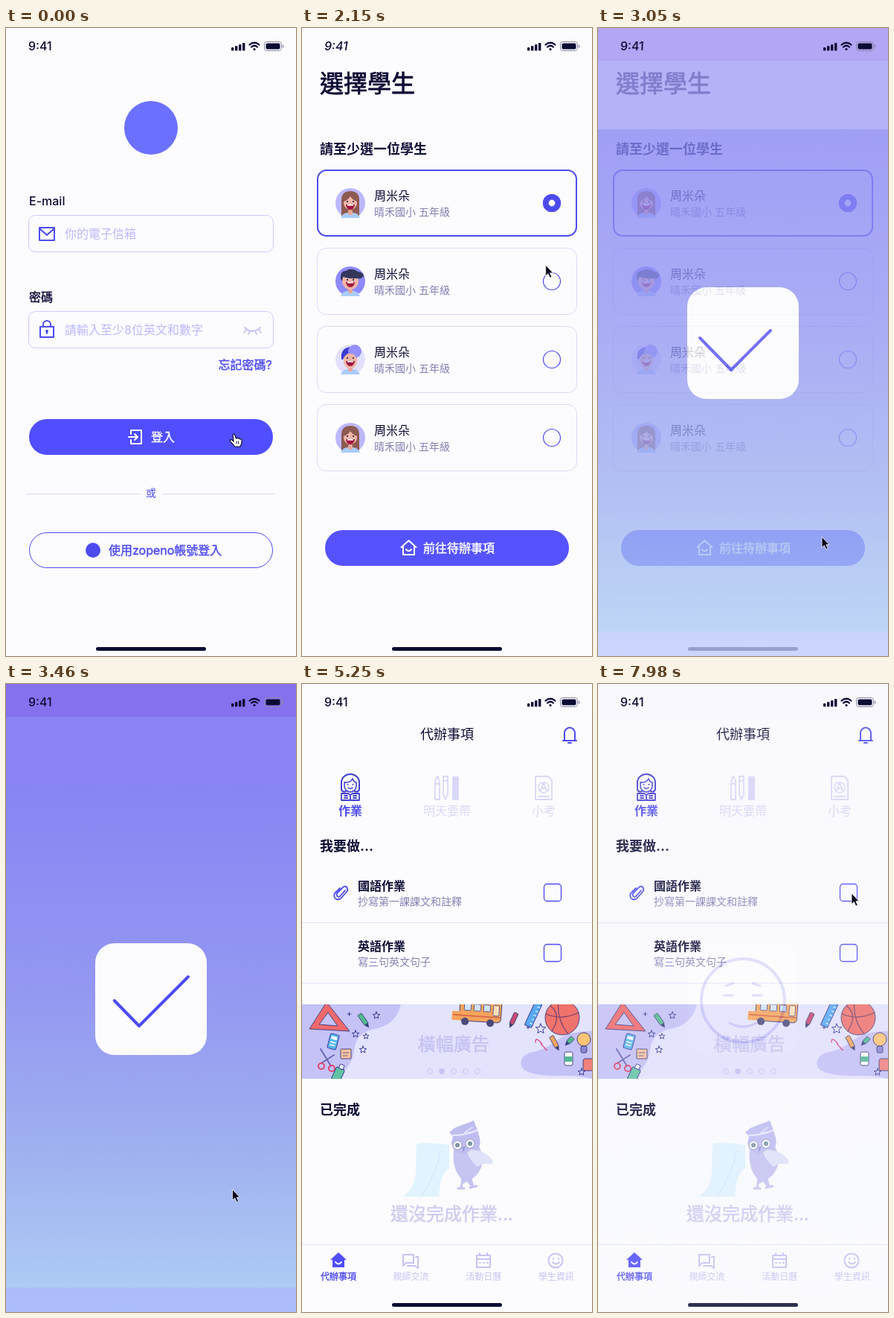
These frames come from a looping animation (390x843 px, 8000 ms). An HTML page:

```html
<!DOCTYPE html>
<html lang="zh-Hant">
<head>
<meta charset="utf-8">
<title>學生待辦事項</title>
<style>
  html, body { margin: 0; width: 100%; height: 100%; overflow: hidden; background: #fcfcff; }
  svg { display: block; width: 390px; height: 843px; }
  text { font-family: Inter, "Noto Sans CJK TC", "Noto Sans CJK", sans-serif; white-space: pre; }
</style>
</head>
<body>
<svg id="stage" viewBox="0 0 390 843" xmlns="http://www.w3.org/2000/svg"></svg>
<script>
const INK = '#0c0b33', VIOLET = '#4d4bf0', PALE = '#c6c3f2', FAINT = '#dad8f8', GREY = '#8482b2', BG = '#fcfcff';

// Drawing helpers, all returning SVG markup
const text = (x, y, s, size = 16, fill = INK, weight = 400, extra = '') =>
  `<text x="${x}" y="${y}" font-size="${size}" fill="${fill}" font-weight="${weight}" ${extra}>${s}</text>`;
// A thin outline gives the medium weight that the CJK face lacks
const medium = (x, y, s, size, fill = INK) => text(x, y, s, size, fill, 400, `stroke="${fill}" stroke-width="${size / 40}"`);
const rect = (x, y, w, h, r, fill = 'none', stroke = 'none', sw = 1) =>
  `<rect x="${x}" y="${y}" width="${w}" height="${h}" rx="${r}" fill="${fill}" stroke="${stroke}" stroke-width="${sw}"/>`;
const circle = (x, y, r, fill = 'none', stroke = 'none', sw = 1) =>
  `<circle cx="${x}" cy="${y}" r="${r}" fill="${fill}" stroke="${stroke}" stroke-width="${sw}"/>`;
const shape = (d, fill) => `<path d="${d}" fill="${fill}"/>`;
const line = (d, stroke, sw = 2, extra = '') =>
  `<path d="${d}" fill="none" stroke="${stroke}" stroke-width="${sw}" stroke-linecap="round" stroke-linejoin="round" ${extra}/>`;
const at = (x, y, body, angle = 0) => `<g transform="translate(${x} ${y}) rotate(${angle})">${body}</g>`;
const layer = (id, body) => `<g id="${id}">${body}</g>`;
const page = (id, body, italic) => layer(id, rect(0, 0, 390, 843, 0, BG) + body + statusBar(italic) + homeBar);

const homeBar = rect(121, 831, 148, 5, 2.5, INK);
const statusBar = italic =>
  text(30, 30, '9:41', 16, INK, 500, italic ? 'font-style="italic"' : '') +
  [0, 1, 2, 3].map(i => rect(303 + i * 5, 26 - i * 2, 3.4, 4.5 + i * 2, 1, INK)).join('') +
  line('M327.5 22.5Q334 17 340.5 22.5M330 25.5Q334 22 338 25.5', INK, 2.2) + circle(334, 28.5, 1.6, INK) +
  rect(347.5, 18.5, 23, 12, 3.5, 'none', '#8c8ba6') + rect(349.5, 20.5, 19, 8, 2, INK) + rect(371.8, 22.5, 1.4, 4, .7, '#8c8ba6');

const houseIcon = (color, solid) => solid
  ? shape('M0-11L11-1H8V9H-8V-1H-11Z', color) + line('M-4 2Q0 7 4 2', '#fff', 2)
  : line('M-10-1L0-10L10-1M-7.5-3V9H7.5V-3M-3.5 2Q0 6 3.5 2', color, 2);

// Sign-in page
const login = page('login',
  circle(195, 134, 36, '#6c70ff') +
  text(31, 238, 'E-mail', 16, INK, 500) + rect(30.5, 251.5, 329, 49, 9, BG, '#cfcbff') +
  line('M45 268H65V285H45ZM45 269L55 278L65 269', VIOLET, 2) + text(79, 282, '你的電子信箱', 16, '#bcb7ff') +
  medium(31, 367, '密碼', 16) + rect(30.5, 380.5, 329, 49, 9, BG, '#cfcbff') +
  line('M46 401H64V415H46ZM50 401V398A5 5 0 0 1 60 398V401M55 408V410', VIOLET, 2) + circle(55, 407, 2, VIOLET) +
  text(79, 411, '請輸入至少8位英文和數字', 16, '#bcb7ff') +
  line('M321 402Q331 412 342 402M323 405L320 409M328 407L326 411M335 407L337 411M340 405L343 409', PALE, 1.8) +
  medium(285.5, 458, '忘記密碼?', 16, VIOLET) +
  rect(31, 525, 328, 48, 24, '#504eff') +
  line('M168 545V540H182V558H168V553M165 549H176M173 545L177 549L173 553', '#fff', 2) +
  medium(195, 555, '登入', 16, '#fff') +
  line('M27 625.5H181M210 625.5H361', FAINT, 1) + text(188, 629, '或', 14, VIOLET) +
  rect(31.5, 677.5, 327, 47, 23.5, BG, VIOLET) + circle(117, 701, 10, VIOLET) +
  medium(138, 707, '使用zopeno帳號登入', 16, VIOLET));

// Student picker
const faceParts = mouthY =>
  circle(-4, -2, 1, INK) + circle(4, -2, 1, INK) + shape(`M-6 ${mouthY}H6Q5 ${mouthY + 7} 0 ${mouthY + 7}T-6 ${mouthY}`, '#a3143f') +
  rect(-4, mouthY, 8, 1.6, 0, '#fff');
const shirt = shape('M-13 20Q-10 13-4 13H4Q10 13 13 20Z', '#a9cdff') + rect(-3, 9, 6, 7, 2, '#e9a79a');
const avatars = {
  girl: circle(0, 0, 20, '#bdb8ff') + shape('M-12 17V-4Q-12-16 0-16T12-4V17Z', '#8d5a50') + shirt +
    circle(0, 0, 9, '#f2b6a8') + shape('M-9-2Q-8-12 0-12T9-2Q3-4 0-9Q-3-4-9-2', '#8d5a50') + faceParts(2),
  boy: circle(0, 0, 20, '#8e8aff') + shirt + circle(0, 0, 11, '#f2b6a8') +
    shape('M-13-3Q-14-14-6-14Q2-19 10-13Q18-12 18-7Q14-2 9-4Q-2-3-10-6L-11 0Z', '#34385c') + faceParts(1),
  cap: circle(0, 0, 20, '#e3e0ff') + shirt + rect(-9, -11, 18, 23, 9, '#efb5a5') +
    shape('M-12 0Q-14-15 0-17L5-10Q-6-10-10 0Z', '#3b3bd0') + circle(6, -11, 9, '#9490ff') + circle(0, 0, 8, '#efb5a5') + faceParts(2),
};
const studentCard = (kind, i) => at(0, i * 105,
  rect(20.5, 190.5, 349, 89, 12, BG, FAINT) + at(65, 235, avatars[kind]) +
  text(97, 231, '周米朵') + text(97, 252, '晴禾國小 五年級', 14, GREY) + circle(336, 235, 11.5, BG, VIOLET, 1.2));
const goButton = (fill, ink) => rect(31, 674, 328, 48, 24, fill) + at(143.5, 698, houseIcon(ink)) + medium(163, 704, '前往待辦事項', 16, ink);
const students = page('students',
  medium(24, 86, '選擇學生', 32) + text(24, 169, '請至少選一位學生', 18, INK, 700) +
  ['girl', 'boy', 'cap', 'girl'].map(studentCard).join('') + goButton('#dddaff', '#9794bb') +
  layer('chosen', rect(21, 191, 348, 88, 12, 'none', VIOLET, 2) + circle(336, 235, 8.2, BG, VIOLET, 7.6) + goButton('#5553ff', '#fff')),
  true);

// To-do page
const star = (x, y, r = 5) => {
  const p = [...Array(10)].map((_, i) => {
    const a = i * Math.PI / 5, d = i % 2 ? r * .45 : r;
    return `${(x + d * Math.sin(a)).toFixed(1)} ${(y - d * Math.cos(a)).toFixed(1)}`;
  });
  return line(`M${p.join('L')}Z`, '#3b3f9a', 1);
};
const pencil = (x, y, angle, color, len = 16) => at(x, y,
  rect(-3, -len / 2, 6, len, 1, color, '#3b3f7a', .8) + shape(`M-3 ${len / 2}H3L0 ${len / 2 + 6}Z`, '#3b3f7a'), angle);
const bus = at(236, 441,
  rect(-24, -16, 56, 28, 5, '#f5a55c', '#4a4180') + shape('M-34 0H-22V12H-34Z', '#f5a55c') +
  [-18, -5, 8].map(x => rect(x, -11, 9, 9, 1, '#cfe3ff', '#4a4180', .8)).join('') + line('M-32 5H30', '#d96b4c', 2) +
  circle(-16, 13, 5, '#4a4a7c') + circle(18, 13, 5, '#4a4a7c') + rect(21, -11, 8, 14, 1, '#ffe0b8', '#4a4180', .8), 4);
const banner = `<clipPath id="strip"><rect y="430" width="390" height="100"/></clipPath><g clip-path="url(#strip)">` +
  rect(0, 430, 390, 100, 0, '#e4e3fe') +
  shape('M0 430H133Q126 458 98 463Q72 468 70 492Q66 522 34 530H0Z', '#c5c2f8') +
  shape('M390 466Q358 465 341 480Q325 492 306 495Q290 502 296 515Q304 526 345 526Q370 525 390 530Z', '#c5c2f8') +
  `<path d="M10 463L33 427L64 466ZM23 457L35 441L48 459Z" fill="#f0696b" fill-rule="evenodd" stroke="#4a4180"/>` +
  pencil(82, 450, -35, '#53b98f') + pencil(285, 449, 25, '#c84a72') + pencil(339, 480, -28, '#f3a45d') + pencil(361, 478, 45, '#53b98f', 9) +
  at(42, 480, rect(-6, -10, 12, 20, 2, '#58b7ee', '#3b3f9a') + rect(-4, -7, 8, 4, 0, '#fff') + line('M-3 1H3M-3 5H3', '#fff', 1.5), 15) +
  rect(52, 490, 14, 13, 1, '#f6c3a0', '#4a4180') + line('M55 495H63M55 499H61', '#4a4180', .8) +
  line('M25 490L39 513M43 498L26 509', '#6a68b8', 2) + circle(26, 513, 4, 'none', '#dd466b', 2) + circle(40, 516, 4, 'none', '#dd466b', 2) +
  at(49, 523, rect(-6, -8, 12, 20, 3, '#62c3a2', '#3b3f9a') + rect(-3, -13, 6, 6, 1, '#fff', '#3b3f9a'), 25) +
  bus + at(311, 444, rect(-5, -17, 10, 34, 1, '#58a9f4', '#3b3f9a') + line('M1-12H4M1-6H4M1 0H4M1 6H4M1 12H4', '#fff', 1), 25) +
  circle(350, 448, 23, '#f0736d', '#4a4180') + line('M328 443Q350 452 372 441M345 426Q342 450 358 470M334 432Q350 444 336 466', '#74406c', 1.2) +
  circle(379, 477, 9, '#ffc474', '#4a4180') + rect(375, 486, 8, 9, 2, '#8587d2', '#4a4180') +
  rect(353, 494, 11, 18, 2, '#fff', '#4a4180') + rect(353, 500, 11, 7, 0, '#57b695') + rect(378, 503, 18, 16, 3, '#f0817d', '#4a4180') +
  line('M314 481Q314 474 319 479T322 483T326 488T327 490', '#d95b94', 1.5) +
  star(72, 470) + star(100, 445) + star(86, 473, 4) + star(82, 491) + star(321, 463, 7) + star(376, 521) +
  line('M61 443H66M63.5 440.5V445.5M302 461H306M304 459V463', '#3b3f9a', 1) +
  medium(156, 492, '橫幅廣告', 24, PALE) +
  [0, 1, 2, 3, 4].map(i => circle(172 + i * 16, 520, 3.5, i === 1 ? PALE : 'none', PALE)).join('') + '</g>';

const owl =
  shape('M154 617Q176 614 198 619V650Q186 655 184 688H135Q152 678 153 655Z', '#e0f3ff') +
  line('M186 626Q181 660 160 688', '#cbe6fb', 1) +
  shape('M204 622Q201 650 214 664L217 671L222 668L228 676L229 664Q242 655 244 636L238 620Z', '#c6c4f0') +
  shape('M198 602L205 596L231 586L236 599L238 606Q243 620 232 628L218 631Q203 630 201 616L203 607Z', '#bfbdf0') +
  shape('M227 625Q250 627 257 641L254 645Q244 642 236 648Q226 640 222 629Z', '#e0e2fa') +
  line('M201 606Q220 606 236 599', '#e9e7ff', 2) + line('M219 602L229 595M220 603L230 601', '#e9e7ff', 1.5) +
  line('M216 664L214 676M226 662L230 674M210 677H218M226 676L235 674', PALE, 3) +
  [[209, 619], [226, 617]].map(([x, y]) => circle(x, y, 6, '#f8f8ff', '#a9abc8', 1.2) + circle(x, y, 3, '#7d93a6')).join('') +
  shape('M215 621H220L217 629Z', '#9d9bd8');

const task = (dy, title, note) => at(0, dy,
  text(75, 276.5, title, 16, INK, 700) + text(75, 297, note, 14, GREY) +
  rect(325.5, 268.5, 23, 23, 4, BG, VIOLET, 1.3) + line('M0 320.5H390', '#e4e2fa', 1));

const readerIcon = line('M53 142V132A12 11 0 0 1 77 132V142Q75 146 71 144M53 142Q55 146 59 144', '#403ed0', 2) +
  line('M57 132Q65 133 68 127Q70 132 73 132V137A8 8 0 0 1 57 137ZM62 139Q65 142 68 139M61 135H62M68 135H69', '#403ed0', 1.6) +
  line('M53 147H62L65 149L68 147H77V156H53ZM65 149V156M57 150H61M69 150H73M57 153H61M69 153H73', '#403ed0', 1.8);
const toolsIcon = line('M179 130L182 124L185 130V155H179ZM179 134H185M190 124H196V148L193 155L190 148ZM190 130H196', FAINT, 1.8) + rect(202, 124, 9, 32, 1, FAINT);
const quizIcon = line('M314 124H331L336 129V155H314ZM318 151H332M321 143L325 133L329 143M323 140H327', FAINT, 1.8) + circle(325, 139, 7, 'none', FAINT, 1.5);

const tabs = line('M0 752.5H390', '#e4e2fa', 1) +
  at(49, 774, houseIcon('#504eff', true)) +
  line('M136 766H150V777H140L136 781ZM153 769H156V784L152 781H142', PALE, 2) +
  line('M235 767H253V783H235ZM235 772H253M239 764V767M249 764V767M239 777H240M244 777H245M249 777H250', PALE, 2) +
  circle(341, 774, 9.5, 'none', PALE, 2) + line('M338 771V772M345 771V772M337 776Q341 781 346 776', PALE, 2) +
  ['代辦事項', '親師交流', '活動日曆', '學生資訊'].map((s, i) => (i ? text : medium)(25 + i * 97.6, 800, s, 12, i ? PALE : VIOLET)).join('');

const todo = page('todo',
  text(159, 74, '代辦事項', 18) +
  line('M351 76H369M353 76V66A7 7.5 0 0 1 367 66V76M358 79H362', VIOLET, 2) +
  readerIcon + toolsIcon + quizIcon +
  text(49, 176, '作業', 16, VIOLET, 700) + text(163, 176, '明天要帶', 16, FAINT) + text(309, 176, '小考', 16, FAINT) +
  text(24, 224, '我要做...', 18, INK, 700) +
  at(52, 280, line('M6-3L-1 5Q-4 7-5 4Q-6 2-4 0L3-7Q7-10 9-6Q10-3 8-1L0 8Q-5 11-8 7Q-10 3-7 0L-1-6', VIOLET, 1.8)) +
  task(0, '國語作業', '抄寫第一課課文和註釋') + task(81, '英語作業', '寫三句英文句子') +
  banner + text(24, 578, '已完成', 18, INK, 700) + owl + medium(119, 720, '還沒完成作業...', 24, '#cfccf0') + tabs);

// Pop-ups
const gradient = (id, ...stops) => `<linearGradient id="${id}" x2="0" y2="1">` +
  stops.map(([offset, color]) => `<stop offset="${offset}" stop-color="${color}"/>`).join('') + '</linearGradient>';
const popup = (id, panel, icon) => layer(id, rect(0, 0, 390, 843, 0, BG) +
  layer(id + 'Wash', rect(0, 0, 390, 843, 0, 'url(#wash)') + rect(0, 0, 390, 44, 0, '#8571ee')) +
  panel + rect(120, 348, 150, 150, 26, '#fcfcff') + icon + statusBar());
const donePopup = popup('done', rect(0, 136, 390, 674, 0, 'url(#panel)'),
  line('M137 416L179 459L245 393', VIOLET, 4, 'id="tick" pathLength="1"'));
const smilePopup = popup('smile', '',
  circle(195, 425, 56, 'none', VIOLET, 4) +
  line('M169 418H181M208 418H220M172 405L182 402M208 402L218 405M177 455Q195 465 213 455', VIOLET, 3));

const arrow = `<path d="M0 0V14.5L3.3 11.5L5.8 17L8.2 16L5.8 10.6H10Z" fill="#05051a" stroke="#fff" stroke-width=".8"/>`;
const hand = `<path d="M2 1Q4-1 5 2L6.500 6Q8 4 9 6Q11 5 11.500 7Q14 6 14 9V12L12 17H5L-2 9Q-2 7 1 8L3 10Z" fill="#fff" stroke="#05051a" stroke-width="1.1"/>` +
  line('M7 10V13M9.500 10V13', '#05051a', .9);

document.getElementById('stage').innerHTML =
  `<defs>${gradient('wash', [0, '#8a84f6'], [.2, '#8a84f6'], [1, '#aebefc'])}` +
  `${gradient('panel', [0, '#8785f4'], [.4, '#9497f2'], [.7, '#9eaef0'], [1, '#adcbf4'])}</defs>` +
  login + students + donePopup + todo + smilePopup +
  layer('cursor', layer('arrow', arrow) + layer('hand', hand));

// Timing
const el = Object.fromEntries([...document.querySelectorAll('g[id], #tick')].map(n => [n.id, n]));
const progress = (t, start, length) => Math.min(1, Math.max(0, (t - start) / length));
const ease = p => p < .5 ? 2 * p * p : 1 - 2 * (1 - p) * (1 - p);
const fade = (t, start, length = 330) => ease(progress(t, start, length));

const cursorPath = [
  [0, 303, 545], [600, 303, 545], [1260, 280, 307], [1650, 334, 232], [1950, 334, 232], [2600, 301, 683],
  [3400, 301, 683], [3850, 395, 560], [5950, 395, 380], [6490, 344, 300], [7000, 341, 281], [8000, 341, 281],
];
function cursorAt(t) {
  const i = cursorPath.findIndex(k => k[0] > t);
  const [t0, x0, y0] = cursorPath[i - 1], [t1, x1, y1] = cursorPath[i];
  const p = ease((t - t0) / (t1 - t0));
  return [x0 + (x1 - x0) * p, y0 + (y1 - y0) * p];
}
const setOpacity = (id, value) => {
  el[id].setAttribute('opacity', value);
  el[id].style.display = value > 0 ? '' : 'none';
};
function showPopup(id, amount) {
  setOpacity(id, amount);
  setOpacity(id + 'Wash', amount);
}

function draw(t) {
  setOpacity('students', fade(t, 100));
  setOpacity('chosen', fade(t, 1800, 200));
  showPopup('done', fade(t, 2830));
  setOpacity('todo', fade(t, 3650));
  showPopup('smile', fade(t, 7890));

  const shift = .12 * Math.cos(Math.PI * (t - 2900) / 150);
  el.tick.setAttribute('stroke-dasharray', `${1 - Math.abs(shift)} 2`);
  el.tick.setAttribute('stroke-dashoffset', -Math.max(0, shift));

  el.cursor.setAttribute('transform', `translate(${cursorAt(t)})`);
  const pointing = t < 400 || (t > 1600 && t < 2000);
  setOpacity('hand', pointing ? 1 : 0);
  setOpacity('arrow', pointing ? 0 : 1);
}

const began = performance.now();
function tick() {
  draw((performance.now() - began) % 8000);
  requestAnimationFrame(tick);
}
tick();
</script>
</body>
</html>
```
